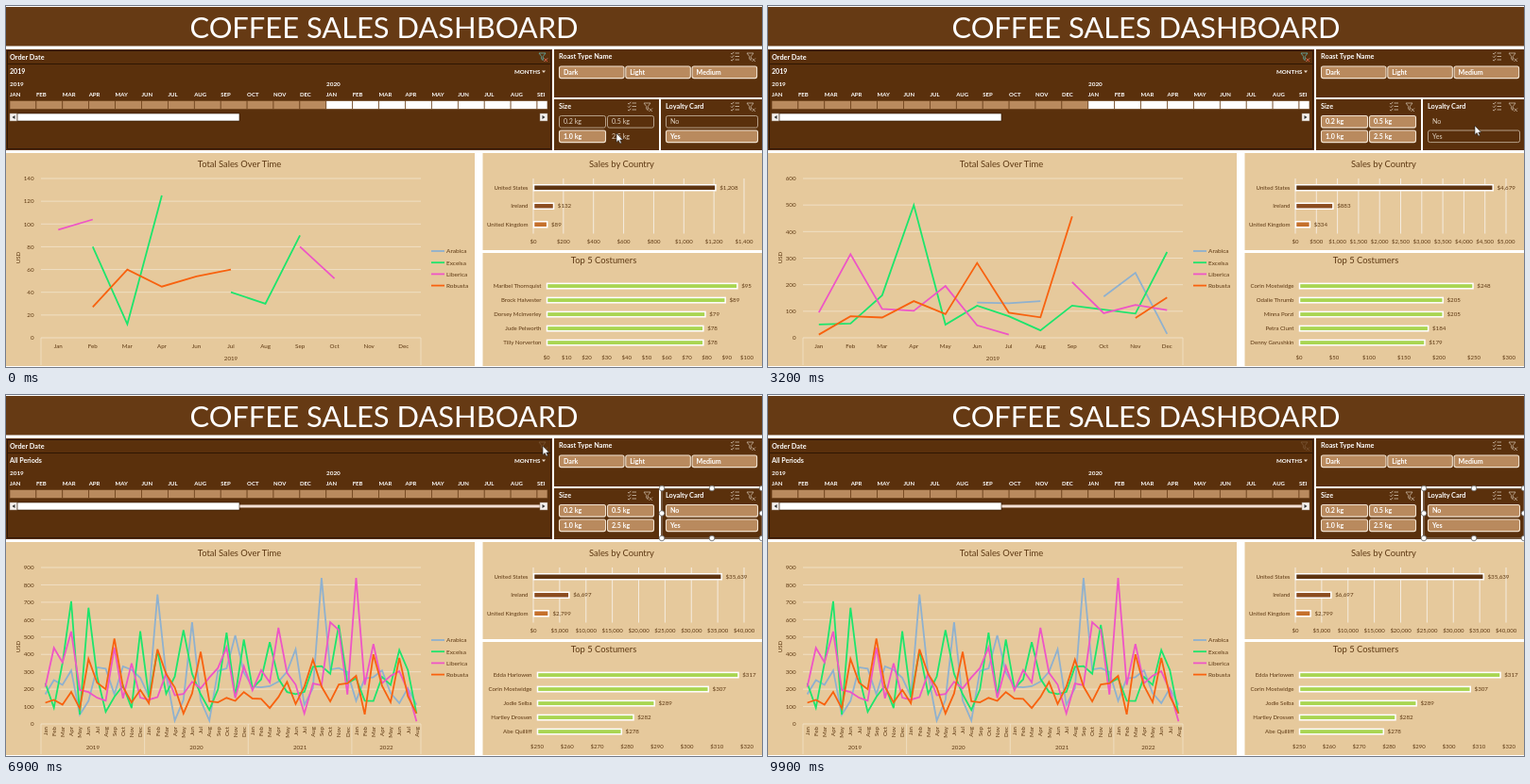
These frames come from a looping animation (800x383 px, 10 s). An HTML page:

```html
<!DOCTYPE html>
<html lang="en">
<head>
<meta charset="utf-8">
<title>Coffee Sales Dashboard</title>
<style>
html, body { margin: 0; height: 100%; overflow: hidden; background: #fff; }
svg { display: block; width: 100vw; height: 100vh; font-family: Lato, "Open Sans", sans-serif; white-space: pre; }
</style>
</head>
<body>
<svg viewBox="0 0 800 383"><g id="board"></g><g id="cursor">
  <path id="cross" d="M-4 0H4M0-4V4M-3-1.2L-4 0L-3 1.2M3-1.2L4 0L3 1.2M-1.2-3L0-4L1.2-3" stroke="#fff" fill="none"/>
  <path d="M0 0V9.5L2.2 7.5L3.8 11L5.3 10.3L3.8 7H6.7Z" fill="#fff" stroke="#222" stroke-width=".6"/>
</g></svg>
<script>
const LOOP = 10000;
const BROWN = '#5a300c', BAR = '#663a14', TAN = '#b98a5e', SAND = '#e6c99c', INK = '#5d3812', GRID = '#f3e5ce';
const MONTHS = 'Jan Feb Mar Apr May Jun Jul Aug Sep Oct Nov Dec'.split(' ');
const SERIES = { Arabica: '#8fb1cf', Excelsa: '#1de56c', Liberica: '#ee55c6', Robusta: '#f8620f' };
const COUNTRY = { 'United States': '#5e3411', Ireland: '#8c4d20', 'United Kingdom': '#c5702c' };
const SIZES = ['0.2 kg', '0.5 kg', '1.0 kg', '2.5 kg'];
const GAP = null;

function random(seed) {
  return () => (seed = seed * 16807 % 2147483647) / 2147483647;
}

// Monthly sales that wander around a base level, apart from the given peaks and gaps
function trace(length, base, spread, peaks) {
  const next = random(base * 97 + length);
  return Array.from({ length }, (_, i) => {
    const value = base + (next() * 2 - 1) * spread;
    return i in peaks ? peaks[i] : value;
  });
}

// Short stretches of sales, keyed by their first month
function runs(stretches) {
  const row = [];
  for (const [start, values] of Object.entries(stretches)) values.forEach((v, i) => row[+start + i] = v);
  return Array.from(row);
}

// Rows follow the order of SERIES
const largeBags = [
  {}, { 1: [80, 12, 125], 5: [40, 30, 90] }, { 0: [95, 104], 7: [80, 52] }, { 1: [27, 60, 45, 54, 60] }].map(runs);
const smallBags = [
  { 6: [23, 18] }, { 0: [108, 9, 84], 8: [42, 22] }, { 1: [35, 76], 4: [27, 39] }, { 3: [23, 52, 5], 7: [43, 24] }].map(runs);
const members = [
  trace(12, 145, 30, { 0: GAP, 1: 164, 2: GAP, 3: 241, 4: GAP, 8: GAP, 10: 245, 11: 15 }),
  trace(12, 85, 40, { 2: 160, 3: 500, 7: 28, 11: 323 }),
  trace(12, 120, 30, { 1: 315, 4: 195, 5: 47, 6: 12, 7: GAP, 8: 210 }),
  trace(12, 70, 25, { 0: 12, 3: 138, 5: 282, 8: 457, 9: GAP, 11: 152 })];
const guests = [
  trace(12, 185, 20, { 1: 88, 2: 225, 3: 67, 4: 53, 5: GAP, 10: 67, 11: 250 }),
  trace(12, 195, 15, { 1: 40, 4: 5, 5: 548, 7: 42, 8: 35, 9: 115, 10: GAP }),
  trace(12, 130, 15, { 2: 245, 3: 430, 4: GAP, 8: 230, 9: 55, 10: 225, 11: 47 }),
  trace(12, 45, 25, { 0: 110, 4: GAP, 5: 92, 6: 142, 7: 123, 9: 213 })];
const later = [
  trace(32, 230, 110, { 1: 745, 3: 20, 5: 585, 7: 20, 10: 510, 17: 430, 18: 110, 20: 840, 31: 110 }),
  trace(32, 225, 110, { 1: 420, 4: 540, 7: 80, 9: 525, 11: 485, 14: 470, 22: 570, 29: 425, 31: 60 }),
  trace(32, 220, 120, { 9: 440, 15: 553, 18: 60, 21: 585, 22: 540, 24: 840, 26: 460, 31: 15 }),
  trace(32, 190, 100, { 1: 430, 4: 60, 6: 415, 19: 370, 25: 55, 26: 400, 29: 380, 31: 60 })];
const year2019 = members.map((row, s) => row.map((v, i) => v + guests[s][i]));
const allYears = year2019.map((row, s) => row.concat(later[s]));

// spend axis: [from, to, step, left]
const views = {
  large: { lines: largeBags, top: 140, step: 20, skip: 'May',
    countries: { 'United States': 1208, Ireland: 132, 'United Kingdom': 89 }, sales: [1400, 200],
    people: { 'Maribel Thornquist': 95, 'Brock Halvester': 89, 'Dorsey McInverley': 79, 'Jude Pelworth': 78, 'Tilly Norverton': 78 },
    spend: [0, 100, 10, 572] },
  small: { lines: smallBags, top: 120, step: 20, skip: 'Nov',
    countries: { 'United States': 631, 'United Kingdom': 172, Ireland: 85 }, sales: [700, 100],
    people: { 'Henny Voldrake': 53.8, 'Osgoode Tarvill': 53.7, 'Lowell Sprigg': 52.5, 'Kelsey Wojtarowicz': 43, 'Connie Bruzelka': 41.4, 'Ottilie Emsler': 41.4 },
    spend: [0, 60, 10, 571] },
  members: { lines: members, top: 600, step: 100,
    countries: { 'United States': 4679, Ireland: 883, 'United Kingdom': 334 }, sales: [5000, 500],
    people: { 'Corin Mostwidge': 248, 'Odalie Thrumb': 205, 'Minna Porzi': 205, 'Petra Clunt': 184, 'Denny Garushkin': 179 },
    spend: [0, 300, 50, 562] },
  guests: { lines: guests, top: 600, step: 100,
    countries: { 'United States': 4776, Ireland: 898, 'United Kingdom': 617 }, sales: [6000, 1000],
    people: { 'Trudie Vosk': 205, 'Wenda Frisk': 205, 'Tobias Kuortola': 205, 'Fabrizio Orml': 182, 'Gill Tavao': 179 },
    spend: [165, 210, 5, 559] },
  year: { lines: year2019, top: 800, step: 100,
    countries: { 'United States': 9455, Ireland: 1781, 'United Kingdom': 951 }, sales: [10000, 1000],
    people: { 'Corin Mostwidge': 248, 'Trudie Vosk': 205, 'Wenda Frisk': 205, 'Tobias Kuortola': 205, 'Minna Porzi': 205, 'Odalie Thrumb': 205 },
    spend: [0, 300, 50, 562] },
  all: { lines: allYears, top: 900, step: 100, allPeriods: true,
    countries: { 'United States': 35639, Ireland: 6697, 'United Kingdom': 2799 }, sales: [40000, 5000],
    people: { 'Edda Harlowen': 317, 'Corin Mostwidge': 307, 'Jodie Selba': 289, 'Hartley Drossen': 282, 'Abe Quilliff': 278 },
    spend: [250, 320, 10, 562] }
};
const scenes = [
  { at: 0, view: 'large', on: ['1.0 kg', 'Yes'], pressed: '2.5 kg' },
  { at: 300, view: 'large', on: ['1.0 kg', 'Yes'] },
  { at: 1100, view: 'small', on: ['0.5 kg', 'Yes'] },
  { at: 2000, view: 'small', on: ['0.5 kg', 'Yes'], clearing: true },
  { at: 2250, view: 'members', on: [...SIZES, 'Yes'] },
  { at: 3150, view: 'members', on: SIZES, pressed: 'No' },
  { at: 3300, view: 'guests', on: [...SIZES, 'No'] },
  { at: 5100, view: 'year', on: [...SIZES, 'No', 'Yes'], framed: true },
  { at: 6700, view: 'all', on: [...SIZES, 'No', 'Yes'], framed: true }
];
// Pointer stops: [arrival, x, y]
const GLIDE = 600, LEAVES = 8600;
const stops = [[0, 646, 135], [900, 655, 122], [1900, 681, 104], [3000, 748, 127], [4300, 797, 103],
  [5800, 773, 107], [6600, 568, 54], [7600, 722, 30]];

const rect = (x, y, w, h, fill, extra = '') => `<rect x="${x}" y="${y}" width="${w}" height="${h}" fill="${fill}" ${extra}/>`;
const path = (d, color, width = 1, fill = 'none') => `<path d="${d}" stroke="${color}" stroke-width="${width}" fill="${fill}"/>`;
// y is the middle of the capitals
const text = (x, y, str, size = 6.2, fill = INK, anchor = 'start', extra = '') =>
  `<text x="${x}" y="${y + size * .36}" font-size="${size}" fill="${fill}" text-anchor="${anchor}" ${extra}>${str}</text>`;
const bold = (x, y, str, size = 7.3) => text(x, y, str, size, '#fff', 'start', 'font-weight="700"');
const upright = (x, y, str, anchor) => text(0, 0, str, 6.2, INK, anchor, `transform="translate(${x} ${y}) rotate(-90)"`);
const heading = (x, y, str) => text(x, y, str, 9.4, INK, 'middle');
const money = v => '$' + Math.floor(v).toLocaleString('en-US');
const range = (from, to, step) => Array.from({ length: Math.round((to - from) / step) + 1 }, (_, i) => from + i * step);

const funnel = (x, y, color) => path(`M${x} ${y}h7l-2.7 3.5v4l-1.6-1.2v-2.8zM${x + 5.5} ${y + 5.5}l3.5 3.5m0-3.5l-3.5 3.5`, color, .8);
const checklist = (x, y) => path([0, 3.5, 7].map(d => `M${x} ${y + d}l1.2 1.2l2-2.4M${x + 4.5} ${y + d}h4.5`).join(''), '#d3c3b2', .8);

function slicer(x, y, w, h, title, lit) {
  return rect(x, y, w, h, BROWN) + bold(x + 5, y + 7.5, title) + checklist(x + w - 33, y + 4)
    + (lit ? rect(x + w - 18, y + 2, 13, 12, '#e9e2a8', 'stroke="#8a8a3a" stroke-width=".6"') : '')
    + funnel(x + w - 16, y + 4, lit ? '#5a4a20' : '#c7b4a0');
}

function button(x, y, w, label, scene) {
  const on = !scene || scene.on.includes(label);
  const outline = on ? 'stroke="#f1e2d0" stroke-width="1.1"' : 'stroke="#cdbba8" stroke-width=".8"';
  const box = scene && scene.pressed === label ? '' : rect(x + .5, y + .5, w - 1, 12.6, on ? TAN : 'none', 'rx="2" ' + outline);
  return box + (on ? bold(x + 5, y + 6.7, label, 7.1) : text(x + 5, y + 6.7, label, 7.1, '#e0d2c2'));
}

function timeline(all) {
  const pitch = 27.9;
  const end = (x, d) => rect(x, 114, 8, 8, '#f6f2ee', 'stroke="#8b7a6a" stroke-width=".5"') + path(d, 'none', 0, '#333');
  let out = rect(0, 46, 578, 107, BROWN) + rect(1.5, 47.5, 575, 104, 'none', 'stroke="#2e1603"')
    + path('M2 61.5H576', '#2e1603') + bold(4, 54, 'Order Date') + bold(4, 69.5, all ? 'All Periods' : '2019', 7.1)
    + bold(538, 69.5, 'MONTHS', 6.2) + path('M567 68.5h4l-2 2.4z', 'none', 0, '#e8d8c8')
    + funnel(564, 50, all ? '#7a5636' : '#62b0ad') + (all ? '' : path('M569.5 55.5l3.5 3.5m0-3.5l-3.5 3.5', '#d8553c'))
    + bold(4, 82.5, '2019', 6.4) + bold(339, 82.5, '2020', 6.4);
  for (let i = 0; i < 21; i++) {
    const x = 4 + i * pitch;
    out += bold(x, 94, i === 20 ? 'SEI' : MONTHS[i % 12].toUpperCase(), 6)
      + rect(x, 100.5, Math.min(pitch, 573 - x), 9, all || i < 12 ? TAN : '#fff', 'stroke="#6b401b" stroke-width=".7"');
  }
  return out + (all ? rect(247, 116.5, 318, 3, '#f3dfd5') : '')
    + end(4, 'M9.5 116v4l-3-2z') + end(565, 'M567.5 116v4l3-2z')
    + rect(12, 114, 235, 8, '#fff', 'stroke="#2e1603" stroke-width=".6"');
}

function salesChart({ lines, top, step, skip, allPeriods }) {
  const left = 37, right = 439, high = 183, low = allPeriods ? 349 : 352;
  const months = allPeriods ? Array.from({ length: 44 }, (_, i) => MONTHS[i % 12]) : MONTHS.filter(m => m !== skip);
  const pitch = (right - left) / months.length;
  const px = i => left + (i + .5) * pitch;
  const py = v => low - v / top * (low - high);
  let out = rect(0, 156, 496, 226, SAND) + heading(247, 168, 'Total Sales Over Time') + upright(13, 267, 'USD', 'middle');
  for (const v of range(0, top, step)) out += path(`M${left} ${py(v)}H${right}`, GRID, .8) + text(29.5, py(v), v, 6.2, INK, 'end');
  months.forEach((m, i) => out += allPeriods ? upright(px(i), 352, m, 'end') : text(px(i), 361, m, 6.2, INK, 'middle'));
  const years = allPeriods ? [0, 12, 24, 36, 44] : [0, months.length];
  years.forEach((k, i) => {
    out += path(`M${left + k * pitch} ${low}V381`, GRID, .7);
    if (i) out += text(left + (k + years[i - 1]) / 2 * pitch, 374, 2018 + i, 6.2, INK, 'middle');
  });
  Object.entries(SERIES).forEach(([name, color], s) => {
    const row = lines[s], y = 260 + s * 12.2;
    const d = row.map((v, i) => v == null ? '' : `${row[i - 1] == null ? 'M' : 'L'}${px(i).toFixed(1)} ${py(v).toFixed(1)}`).join('');
    out += path(d, color, 1.8) + path(`M450 ${y}h14`, color, 1.8) + text(466, y, name, 6.5);
  });
  return out;
}

function barChart(values, [from, to, step, left, right], top, height, thick, grid, fill) {
  const px = v => left + (v - from) / (to - from) * (right - left);
  const rows = Object.entries(values), pitch = height / rows.length;
  let out = '';
  for (const v of range(from, to, step))
    out += path(`M${px(v)} ${top}v${height}`, grid) + text(px(v), top + height + 8.5, money(v), 6, INK, 'middle');
  rows.forEach(([name, v], i) => {
    const y = top + (i + .5) * pitch;
    out += text(left - 5.5, y, name, 6.1, INK, 'end')
      + rect(left + .5, y - pitch * thick / 2, px(v) - left, pitch * thick, fill(name), 'stroke="#fff" stroke-width="1.5"')
      + text(px(v) + 4.8, y, money(v));
  });
  return out;
}

function frame() {
  let out = rect(694, 99, 106, 53, 'none', 'stroke="#9a8f86" stroke-width=".8"');
  for (const x of [694, 747, 800]) for (const y of [99, 125.5, 152])
    if (x !== 747 || y !== 125.5) out += `<circle cx="${x}" cy="${y}" r="2.8" fill="#fff" stroke="#666" stroke-width=".8"/>`;
  return out;
}

function draw(scene) {
  const view = views[scene.view];
  return rect(0, 1, 800, 41.5, BAR) + text(400, 22.7, 'COFFEE SALES DASHBOARD', 30.9, '#fff', 'middle')
    + timeline(view.allPeriods)
    + slicer(580, 46, 220, 51, 'Roast Type Name')
    + ['Dark', 'Light', 'Medium'].map((s, i) => button(585 + i * 70.3, 63.5, 69.5, s)).join('')
    + slicer(580, 99, 111, 54, 'Size', scene.clearing)
    + SIZES.map((s, i) => button(585 + i % 2 * 51, 116 + (i >> 1) * 15.5, 50, s, scene)).join('')
    + slicer(693, 99, 107, 54, 'Loyalty Card')
    + ['No', 'Yes'].map((s, i) => button(698, 116 + i * 15.5, 98, s, scene)).join('')
    + salesChart(view)
    + rect(504.5, 156, 295.5, 103, SAND) + heading(651.5, 168, 'Sales by Country')
    + barChart(view.countries, [0, ...view.sales, 558, 781], 183, 58.5, .31, '#f5ecdf', name => COUNTRY[name])
    + rect(504.5, 262, 295.5, 120, SAND) + heading(632.5, 270, 'Top 5 Costumers')
    + barChart(view.people, [...view.spend, 784], 289.6, 75, .36, 'none', () => '#a9d552')
    + (scene.framed ? frame() : '');
}

const board = document.getElementById('board');
const cursor = document.getElementById('cursor');
const cross = document.getElementById('cross');
let shown;

function moveCursor(t) {
  cursor.style.display = t < LEAVES ? '' : 'none';
  const i = stops.findLastIndex(([arrival]) => arrival - GLIDE <= t);
  const [arrival, x1, y1] = stops[i], [, x0, y0] = stops[Math.max(0, i - 1)];
  const p = Math.min(1, (t - arrival + GLIDE) / GLIDE), k = p * p * (3 - 2 * p);
  const x = x0 + (x1 - x0) * k, y = y0 + (y1 - y0) * k;
  cursor.setAttribute('transform', `translate(${x} ${y})`);
  cross.style.display = x > 794 || y < 42 ? '' : 'none';
}

function render(t) {
  const scene = scenes.findLast(s => s.at <= t);
  if (scene !== shown) board.innerHTML = draw(shown = scene);
  moveCursor(t);
}

function tick(now) {
  render(now % LOOP);
  requestAnimationFrame(tick);
}
render(0);
requestAnimationFrame(tick);
</script>
</body>
</html>
```
